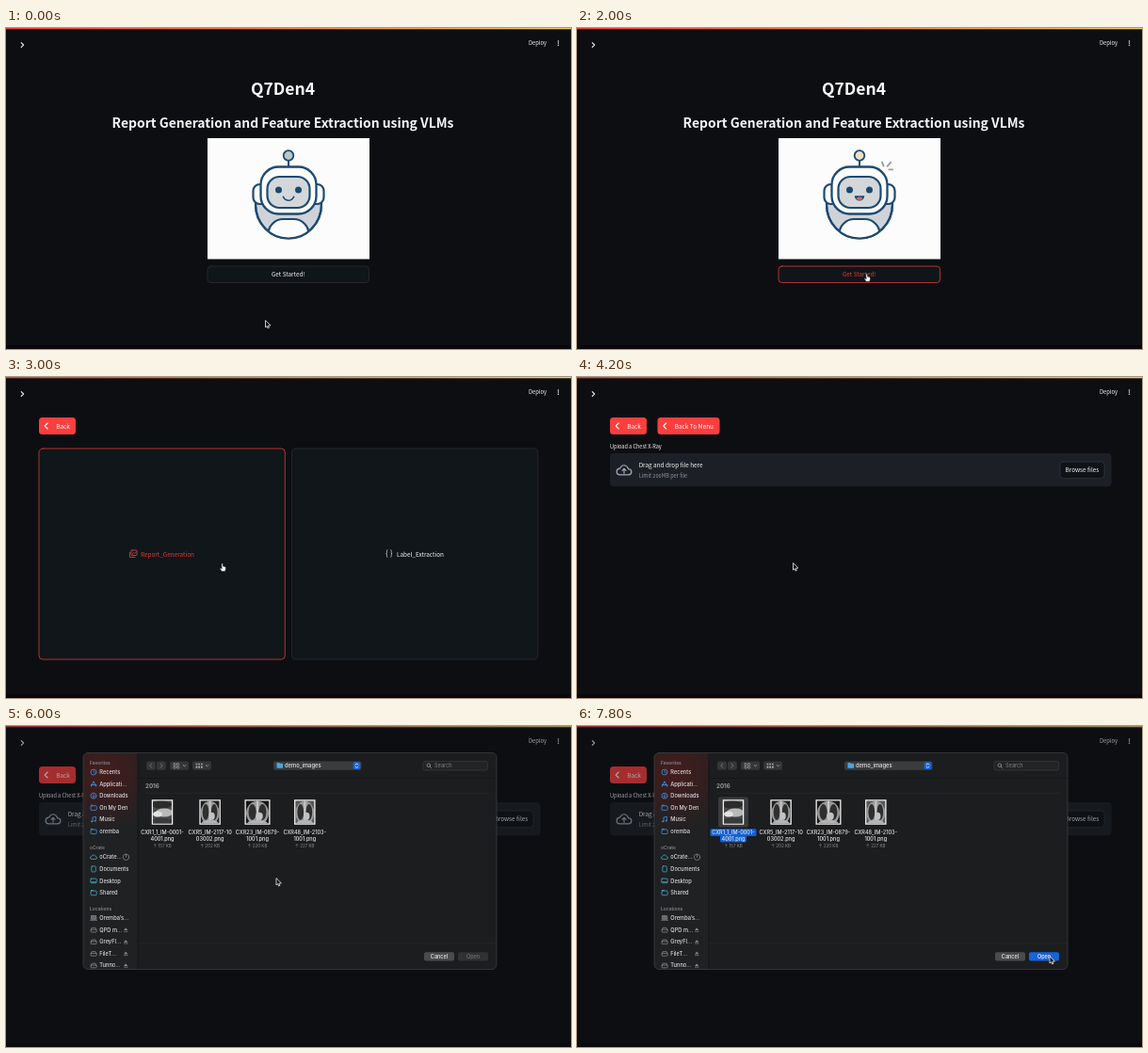
Animation, 600 px wide and 341 px high, one loop 8 s. Source, as an HTML page with a canvas:

```html
<!DOCTYPE html>
<html lang="en">
<head>
<meta charset="utf-8">
<style>
html, body { margin: 0; width: 100%; height: 100%; overflow: hidden; background: #0d0e12; }
canvas { display: block; width: 100vw; height: 100vh; }
</style>
</head>
<body>
<canvas id="stage"></canvas>
<script>
const W = 600, H = 341, LOOP = 8000, STEP = 200;
const MENU_AT = 2400, UPLOAD_AT = 4200, PRESS_AT = 5400, DIALOG_AT = 5600, SELECT_AT = 6800, HAPPY_AT = 1200;
const SANS = '"Noto Sans CJK JP", "Noto Sans CJK SC", "Noto Sans CJK", "Noto Sans", sans-serif';
const UI = 'Inter, "Liberation Sans", sans-serif';
const BG = '#0d0e12', RED = '#fb3e3e', HOVER = '#dc3c36', NAVY = '#1c4a70', BLUE = '#3d95e8', TEAL = '#45a9c4';

const canvas = document.getElementById('stage');
const c = canvas.getContext('2d');

// Pointer path: time, x, y of the tip
const PATH = [
  [0, 275.5, 311], [200, 275.5, 311], [1400, 307.5, 261], [2200, 307.5, 261],
  [2400, 300, 256], [3000, 229.5, 198], [4200, 229.5, 198], [5200, 529, 102],
  [5600, 529, 102], [6000, 287, 162], [6600, 169, 93], [6900, 169, 93],
  [7400, 505, 261], [7600, 504, 248], [7800, 502, 245], [8000, 502, 245]
];

function pointerAt(t) {
  let i = 0;
  while (i < PATH.length - 2 && t >= PATH[i + 1][0]) i++;
  const [t0, x0, y0] = PATH[i], [t1, x1, y1] = PATH[i + 1];
  const p = (t - t0) / (t1 - t0), e = p * p * (3 - 2 * p);
  return { x: x0 + (x1 - x0) * e, y: y0 + (y1 - y0) * e };
}

const inside = (p, x, y, w, h) => p.x > x && p.x < x + w && p.y > y && p.y < y + h;

function text(s, x, y, size, color = '#f5f5f6', { align = 'left', weight = 400, font = SANS } = {}) {
  c.font = `${weight} ${size}px ${font}`;
  c.textAlign = align;
  c.textBaseline = 'alphabetic';
  c.fillStyle = color;
  c.fillText(s, x, y + size * 0.36);
}

function box(x, y, w, h, r, fill, stroke, lw = 0.8) {
  c.beginPath();
  c.roundRect(x, y, w, h, r);
  paint(fill, stroke, lw);
}

function oval(x, y, rx, ry, fill, stroke, lw = 1) {
  c.beginPath();
  c.ellipse(x, y, rx, ry, 0, 0, Math.PI * 2);
  paint(fill, stroke, lw);
}

function paint(fill, stroke, lw) {
  if (fill) { c.fillStyle = fill; c.fill(); }
  if (stroke) { c.strokeStyle = stroke; c.lineWidth = lw; c.stroke(); }
}

function line(color, lw, ...pts) {
  c.beginPath();
  for (let i = 0; i < pts.length; i += 2) c.lineTo(pts[i], pts[i + 1]);
  c.lineCap = c.lineJoin = 'round';
  paint(null, color, lw);
}

function header() {
  c.fillStyle = BG;
  c.fillRect(0, 0, W, H);
  const g = c.createLinearGradient(0, 0, W, 0);
  g.addColorStop(0, '#e8403f');
  g.addColorStop(0.4, '#ec7048');
  g.addColorStop(1, '#ecd268');
  c.fillStyle = g;
  c.fillRect(0, 0, W, 1.3);
  c.fillStyle = '#0a060b';
  c.fillRect(0, 337, W, 4);
  line('#f0f0f0', 1.1, 16.2, 15.6, 18.6, 18, 16.2, 20.4);
  text('Deploy', 555, 16.2, 5.8);
  for (const y of [13.9, 16.1, 18.3]) oval(586.5, y, 0.75, 0.75, '#f0f0f0');
}

function robot(happy) {
  box(214, 117, 172, 128.5, 0, '#fcfcfc');
  oval(300, 187.5, 35, 36, '#cfd2d8', NAVY, 2.2);
  c.save();
  c.beginPath();
  c.ellipse(300, 187.5, 35, 36, 0, 0, Math.PI * 2);
  c.clip();
  box(278.5, 203, 43, 40, 16, '#fcfcfc', NAVY, 2.2);
  c.restore();
  oval(300, 187.5, 35, 36, null, NAVY, 2.2);
  box(260, 140, 80, 46, 0, '#fcfcfc');
  box(262.5, 166, 18, 21, 7, '#fcfcfc', NAVY, 2.2);
  box(319.5, 166, 18, 21, 7, '#fcfcfc', NAVY, 2.2);
  box(270.5, 147.5, 59, 50, 19, '#fcfcfc', NAVY, 2.3);
  box(277.5, 158, 45, 33, 13, '#d3d7da', NAVY, 2.2);
  line(NAVY, 2, 300, 141, 300, 147);
  oval(300, 135.5, 5.3, 5.3, happy ? '#eadfc8' : '#b9c8c6', NAVY, 1.8);
  oval(289.5, 172, 3.5, 3.6, NAVY);
  oval(310.5, 172, 3.5, 3.6, NAVY);
  c.beginPath();
  if (happy) {
    c.arc(300, 178.3, 5.3, 0, Math.PI);
    c.closePath();
    paint(NAVY);
    oval(300, 181.2, 3, 1.6, '#e0685c');
    line('#9a9ca2', 1.9, 324, 142.5, 325.6, 146.6);
    line('#9a9ca2', 1.9, 333, 142.8, 329.6, 146.8);
    line('#9a9ca2', 1.9, 335, 150.4, 331.4, 150.4);
  } else {
    c.arc(300, 177.2, 6, 0.35, Math.PI - 0.35);
    paint(null, NAVY, 1.6);
  }
}

function home(t, p) {
  text('Q7Den4', 294, 64.5, 17.5, '#fafafa', { align: 'center', weight: 700 });
  text('Report Generation and Feature Extraction using VLMs', 294, 100.5, 13.9, '#f6f6f7', { align: 'center', weight: 700 });
  robot(t >= HAPPY_AT);
  const over = inside(p, 214, 253, 172, 18);
  box(214, 253, 171.5, 17.5, 3.5, '#10151a', over ? HOVER : '#2a2e34');
  text('Get Started!', 299.7, 262, 6.4, over ? HOVER : '#f5f5f6', { align: 'center' });
  return over;
}

function backButton(x, w, label) {
  box(x, 43, w, 18, 3.5, RED);
  line('#fff', 1.1, x + 9.2, 49, x + 6.2, 52, x + 9.2, 55);
  text(label, x + 18.3, 52.2, 6.4, '#fff');
}

function card(x, label, labelX, over) {
  box(x, 76, 261.3, 224, 4, '#10161a', over ? HOVER : '#2a2e33');
  text(label, labelX, 188.2, 6.4, over ? HOVER : '#f5f5f6');
}

function menu(p) {
  backButton(35, 39, 'Back');
  const left = inside(p, 35, 76, 261, 224), right = inside(p, 303.5, 76, 261, 224);
  card(35, 'Report_Generation', 143, left);
  card(303.5, 'Label_Extraction', 415, right);
  const a = left ? HOVER : '#f5f5f6', b = right ? HOVER : '#f5f5f6';
  box(133, 184, 6, 5.5, 0.8, null, a, 0.9);
  line(a, 0.9, 131.4, 186, 131.4, 191.4, 137, 191.4);
  line(a, 0.8, 134, 188.2, 135.5, 186.4, 136.6, 187.6, 138, 185.8);
  text('{', 403, 187.6, 8, b);
  text('}', 407.8, 187.6, 8, b);
  return left || right;
}

function cloud(x, y, s, color, lw) {
  c.beginPath();
  c.arc(x - 4.5 * s, y + 1.5 * s, 3.3 * s, Math.PI * 0.5, Math.PI * 1.45);
  c.arc(x, y - 1 * s, 4.2 * s, Math.PI * 1.1, Math.PI * 1.9);
  c.arc(x + 4.8 * s, y + 1.8 * s, 3 * s, Math.PI * 1.5, Math.PI * 0.5);
  c.closePath();
  paint(null, color, lw);
}

function upload(t, p) {
  backButton(35, 39, 'Back');
  backButton(85.5, 66, 'Back To Menu');
  text('Upload a Chest X-Ray', 35, 74, 5.55);
  box(35, 81, 532.5, 35.3, 4, '#1c2026');
  cloud(50, 99, 1, '#a3a8b4', 1.3);
  line('#a3a8b4', 1.2, 50, 102.2, 50, 97.6);
  line('#a3a8b4', 1.2, 48, 99.4, 50, 97.4, 52, 99.4);
  text('Drag and drop file here', 65.7, 94, 6.4);
  text('Limit 200MB per file', 65.7, 105.3, 5.6, '#90939b');
  const over = inside(p, 513, 90, 47, 18) && t < DIALOG_AT;
  const pressed = t >= PRESS_AT && t <= DIALOG_AT;
  box(513, 90, 47, 17.7, 3.5, pressed ? '#f43a3a' : '#0f1217', pressed || over ? HOVER : '#33373e');
  text('Browse files', 536.4, 99, 6.4, over && !pressed ? HOVER : '#f8f8f8', { align: 'center' });
  return over;
}

const ui = (s, x, y, size = 5.7, color = '#dededf', opt = {}) => text(s, x, y, size, color, { font: UI, weight: 500, ...opt });

const ICONS = {
  clock(y) { oval(93, y, 3, 3, null, BLUE, 0.8); line(BLUE, 0.7, 93, y - 1.7, 93, y, 94.3, y + 0.8); },
  apps(y) { line(BLUE, 0.9, 90.3, y + 2.6, 93, y - 2.8, 95.7, y + 2.6); line(BLUE, 0.9, 90, y + 1, 96, y + 1); },
  down(y) { oval(93, y, 3, 3, null, BLUE, 0.8); line(BLUE, 0.8, 93, y - 1.6, 93, y + 1.5); line(BLUE, 0.8, 91.8, y + 0.4, 93, y + 1.6, 94.2, y + 0.4); },
  folder(y, col = BLUE) { box(90, y - 2, 6.2, 4.6, 0.8, null, col, 0.8); line(col, 0.8, 90.4, y - 2.6, 92.4, y - 2.6); },
  note(y) { line(BLUE, 0.8, 92, y + 2, 92, y - 2.4, 95.4, y - 3, 95.4, y + 1.4); oval(91.2, y + 2, 1, 0.8, BLUE); oval(94.6, y + 1.4, 1, 0.8, BLUE); },
  cloud(y) { cloud(93, y, 0.45, TEAL, 0.8); },
  page(y) { box(90.8, y - 3, 4.5, 6, 0.8, null, TEAL, 0.8); },
  desk(y) { box(89.8, y - 2.4, 6.4, 4.6, 0.8, null, TEAL, 0.8); line(TEAL, 0.8, 90.4, y + 1.2, 95.6, y + 1.2); },
  share(y) { ICONS.folder(y, TEAL); },
  host(y) { box(90.4, y - 2.4, 5.4, 3.6, 0.5, '#66666a', '#98989b', 0.6); line('#98989b', 0.8, 89.6, y + 2.2, 96.6, y + 2.2); },
  drive(y) { box(90, y - 0.4, 6.2, 2.8, 0.7, null, '#909093', 0.7); line('#909093', 0.7, 90.2, y, 91.2, y - 2.2, 95, y - 2.2, 96, y); }
};

const PLACES = [
  ['Favorites', 39, [['clock', 'Recents'], ['apps', 'Applicati...'], ['down', 'Downloads'], ['folder', 'On My Den'], ['note', 'Music'], ['folder', 'oremba']], 49],
  ['oCrate', 129, [['cloud', 'oCrate...'], ['page', 'Documents'], ['desk', 'Desktop'], ['share', 'Shared']], 139.3],
  ['Locations', 193.8, [['host', 'Oremba\u2019s...'], ['drive', 'QPD m...'], ['drive', 'GreyFl...'], ['drive', 'FileT...'], ['drive', 'Tunno...']], 204]
];

function sidebar() {
  c.fillStyle = '#202123';
  c.fillRect(82, 28, 58, 231);
  const g = c.createRadialGradient(104, 50, 4, 104, 50, 62);
  g.addColorStop(0, 'rgba(90,26,24,.62)');
  g.addColorStop(1, 'rgba(90,26,24,0)');
  c.fillStyle = g;
  c.fillRect(82, 28, 58, 100);
  line('#111214', 0.7, 140, 28, 140, 259);
  for (const [title, y, rows, top] of PLACES) {
    ui(title, 89, y, 4.9, '#848488', { weight: 600 });
    rows.forEach(([icon, label], i) => {
      const ry = top + i * 12.6;
      ICONS[icon](ry);
      ui(label, 99.3, ry);
      if (icon === 'cloud') {
        oval(127.5, ry, 3.2, 3.2, null, '#a0a0a3', 0.6);
        line('#a0a0a3', 0.6, 127.5, ry - 3, 127.5, ry);
      }
      if (icon === 'drive') {
        c.beginPath();
        c.moveTo(125, ry + 0.5); c.lineTo(127.2, ry - 2); c.lineTo(129.4, ry + 0.5);
        paint('#8b8b8e');
        line('#8b8b8e', 0.7, 125.3, ry + 1.8, 129.1, ry + 1.8);
      }
    });
  }
}

function xray(x, y, w, h, side, tone) {
  box(x, y, w, h, 0, '#f2f2f2');
  c.save();
  c.beginPath();
  c.rect(x + 1.3, y + 1.3, w - 2.6, h - 2.6);
  c.clip();
  c.translate(x + w / 2, y + h / 2);
  c.fillStyle = tone;
  c.fillRect(-w, -h, 2 * w, 2 * h);
  if (side) {
    oval(-1, -8, 11, 4, '#2c2c2c');
    oval(2, 0.5, 9, 4.5, '#b9b9b9');
    oval(-5, 2, 5, 3, '#e2e2e2');
    oval(0, 10, 12, 4, '#3a3a3a');
  } else {
    oval(0, 1, w * 0.44, h * 0.48, '#9b9b9b');
    oval(-w * 0.2, 0, w * 0.15, h * 0.32, '#2f2f2f');
    oval(w * 0.2, 0, w * 0.15, h * 0.32, '#2f2f2f');
    line('#c6c6c6', 2, 0, -h * 0.45, 0, h * 0.4);
    oval(2, h * 0.16, w * 0.14, h * 0.15, '#c2c2c2');
    oval(0, h * 0.45, w * 0.4, h * 0.13, '#b4b4b4');
  }
  c.restore();
}

const FILES = [
  [166, 22.5, 'CXR1_1_IM-0001-', '4001.png', '157', '#4a4a4a'],
  [216.6, 22.5, 'CXR5_IM-2117-10', '03002.png', '202', '#1f1f1f'],
  [267, 27, 'CXR23_IM-0879-', '1001.png', '220', '#161616'],
  [317.3, 22.5, 'CXR48_IM-2103-', '1001.png', '227', '#585858']
];

function toolbar() {
  const grey = '#a9a9ab';
  box(149, 37.5, 9.8, 9.3, 2, '#353638');
  box(160, 37.5, 9.8, 9.3, 2, '#353638');
  line('#77787a', 0.9, 154.7, 40, 152.8, 42.1, 154.7, 44.2);
  line('#77787a', 0.9, 164, 40, 165.9, 42.1, 164, 44.2);
  box(174, 37.5, 20, 9.3, 2, '#343537');
  box(198, 37.5, 20, 9.3, 2, '#343537');
  for (const x of [178, 181.6]) for (const y of [39.7, 42.9]) box(x, y, 2.2, 2.2, 0.3, null, grey, 0.6);
  for (const x of [201.6, 204.3, 207]) {
    box(x, 39.7, 1.7, 1.5, 0, grey);
    box(x, 42.4, 1.7, 2.4, 0, grey);
  }
  for (const x of [189.5, 213.5]) line(grey, 0.8, x - 1.4, 41.5, x, 42.9, x + 1.4, 41.5);
  box(284, 37.5, 93.5, 9.3, 2, '#3b3c3e');
  box(287.5, 39.7, 6.6, 5, 0.8, '#48a5e6');
  box(287.5, 39, 3, 1.6, 0.5, '#48a5e6');
  ui('demo_images', 296, 42.2, 5.8, '#e6e6e7');
  box(368.6, 38.3, 7.7, 7.7, 1.6, '#1864d8');
  line('#fff', 0.8, 371, 41.2, 372.4, 39.8, 373.8, 41.2);
  line('#fff', 0.8, 371, 43.2, 372.4, 44.6, 373.8, 43.2);
  box(443, 37.5, 68.5, 9.5, 2, '#222325', '#404143', 0.6);
  oval(448.8, 41.7, 1.8, 1.8, null, grey, 0.7);
  line(grey, 0.7, 450.2, 43.1, 451.6, 44.5);
  ui('Search', 455, 42.3, 5.6, '#818184', { weight: 400 });
}

function dialog(selected) {
  c.save();
  c.beginPath();
  c.roundRect(82, 28.5, 439, 230, 5);
  c.clip();
  c.fillStyle = '#1c1d1f';
  c.fillRect(82, 28, 440, 232);
  sidebar();
  toolbar();
  line('#111214', 0.6, 140, 55.5, 521, 55.5);
  ui('2016', 148, 64, 6.3, '#a5a5a8', { weight: 600 });
  line('#2a2b2d', 0.6, 148, 71.5, 513, 71.5);
  FILES.forEach(([x, w, a, b, kb, tone], i) => {
    const picked = selected && i === 0, mid = { align: 'center' };
    if (picked) {
      box(150, 75.5, 32, 32, 2, '#3a3b3d');
      box(141.5, 109.2, 49, 7.8, 1.5, '#1260d6');
      box(152, 116, 28, 7.6, 1.5, '#1260d6');
    }
    xray(x - w / 2, 78.3, w, 26.5, i === 0, tone);
    ui(a, x, 113.2, 5.55, '#e4e4e5', mid);
    ui(b, x, 120, 5.55, '#e4e4e5', mid);
    ui('\u2191 ' + kb + ' KB', x, 127, 4.5, '#7d7d80', mid);
  });
  line('#2b2c2e', 0.6, 140, 231, 521, 231);
  box(444, 240.2, 32, 9.3, 2, '#4a4b4d');
  ui('Cancel', 460, 245, 5.5, '#ececed', { align: 'center' });
  box(480, 240.2, 32, 9.3, 2, selected ? '#1763d8' : '#303133');
  ui('Open', 496, 245, 5.5, selected ? '#f4f6fa' : '#707174', { align: 'center' });
  c.restore();
  box(82, 28.5, 439, 230, 5, null, '#424345', 0.7);
}

function pointer({ x, y }, hand) {
  c.save();
  c.translate(x, y);
  c.lineJoin = 'round';
  if (hand) {
    c.beginPath();
    c.moveTo(-0.6, 0.6);
    c.quadraticCurveTo(0.2, -0.5, 0.9, 0.6);
    c.lineTo(1.1, 3.1);
    c.quadraticCurveTo(3.8, 3, 4, 4.6);
    c.quadraticCurveTo(4.1, 6.6, 3.2, 8.4);
    c.lineTo(-0.5, 8.4);
    c.lineTo(-2.4, 5.4);
    c.quadraticCurveTo(-2, 4.2, -0.5, 5.4);
    c.closePath();
    paint('#fff', '#111', 0.6);
  } else {
    c.beginPath();
    c.moveTo(0, 0); c.lineTo(0, 7); c.lineTo(1.6, 5.6); c.lineTo(2.7, 8);
    c.lineTo(3.9, 7.4); c.lineTo(2.8, 5.2); c.lineTo(5, 5);
    c.closePath();
    paint('#0a0a0a', '#f4f4f4', 0.8);
  }
  c.restore();
}

function draw(t) {
  const p = pointerAt(t);
  header();
  const hand = t < MENU_AT ? home(t, p) : t < UPLOAD_AT ? menu(p) : upload(t, p);
  if (t >= DIALOG_AT) {
    const open = t > DIALOG_AT;
    if (open) {
      c.fillStyle = 'rgba(13,14,17,.36)';
      c.fillRect(0, 0, W, H);
    }
    c.save();
    c.globalAlpha = open ? 1 : 0.2;
    c.translate(0, open ? 0 : -14);
    dialog(t >= SELECT_AT);
    c.restore();
  }
  pointer(p, hand);
}

function resize() {
  const d = window.devicePixelRatio || 1;
  canvas.width = Math.round(innerWidth * d);
  canvas.height = Math.round(innerHeight * d);
}

let start = null;
function tick() {
  const now = performance.now();
  if (start === null) start = now;
  const t = Math.floor(((now - start) % LOOP) / STEP) * STEP;
  c.setTransform(canvas.width / W, 0, 0, canvas.height / H, 0, 0);
  draw(t);
  requestAnimationFrame(tick);
}

addEventListener('resize', resize);
resize();
tick();
</script>
</body>
</html>
```
